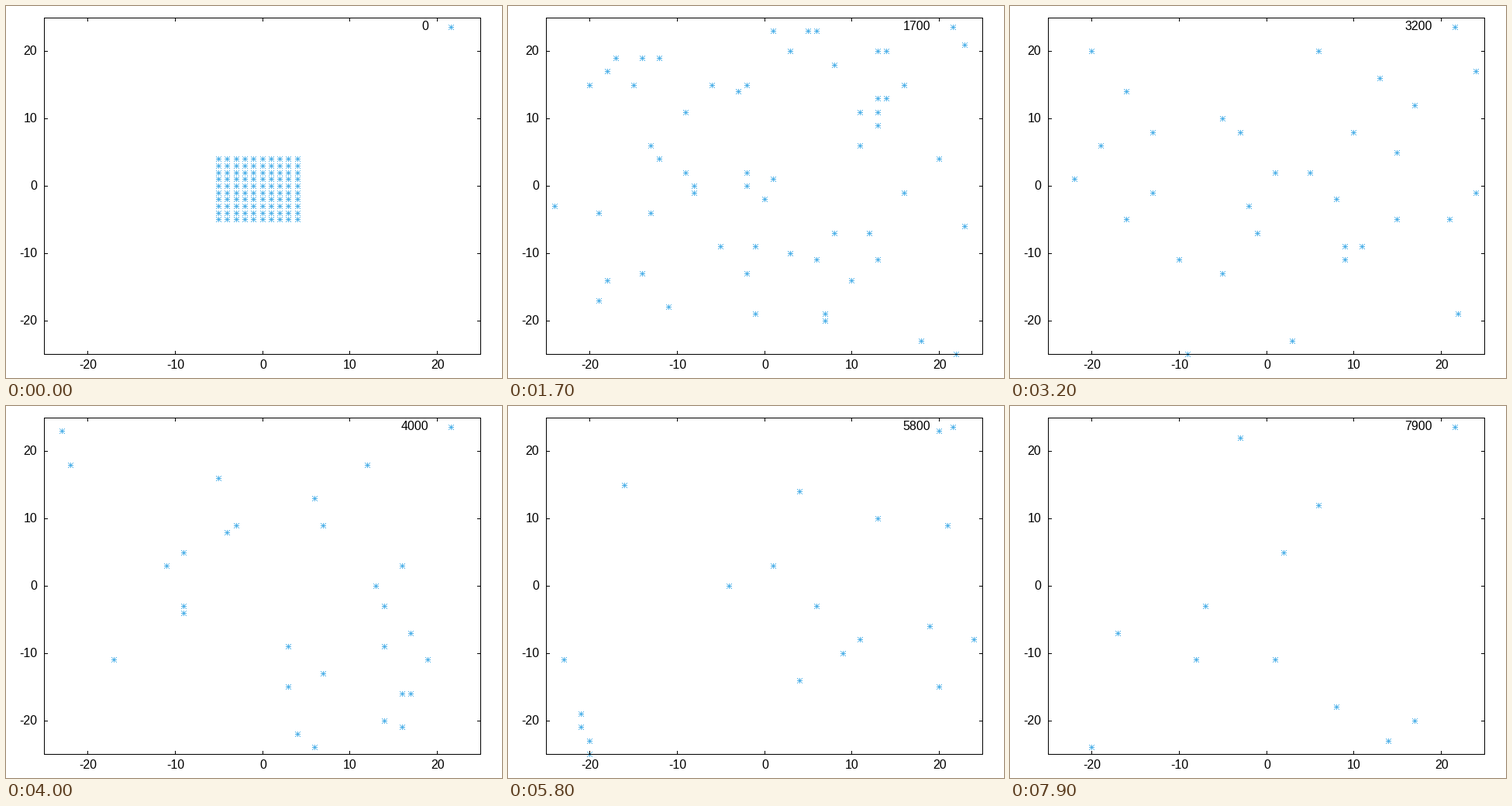
Write a matplotlib script that moves like this. It is 640 px wide and 480 px high and loops after 8000 ms.

```python
import numpy as np
import matplotlib.pyplot as plt
from matplotlib.animation import FuncAnimation
from matplotlib.collections import PolyCollection
from matplotlib.patches import Rectangle

W, H, DPI = 640, 480, 100
LEFT, RIGHT, TOP, BOTTOM = 49, 612, 15, 449
LIM = 25
FRAMES, STEPS = 80, 100
SPREAD = 5.5  # deviation per axis after STEPS steps
SKY = "#56B4E9"


def walk():
    """Free lattice walks of 100 particles, starting as a 10 x 10 block."""
    rng = np.random.default_rng(11)
    side = np.arange(-5, 5)
    start = np.stack(np.meshgrid(side, side), -1).reshape(-1, 2)
    moves = rng.normal(0, SPREAD, (FRAMES, len(start), 2))
    moves[0] = 0
    return np.rint(start + moves.cumsum(axis=0))


def px(x):
    return np.floor(LEFT + (x + LIM) * (RIGHT - LEFT) / (2 * LIM) + 0.5)


def py(y):
    return BOTTOM - np.floor((y + LIM) * (BOTTOM - TOP) / (2 * LIM) + 0.5)


# Seven-pixel asterisk built from unit squares.
DOTS = np.array(sorted({p for d in range(-3, 4)
                        for p in ((d, 0), (0, d), (d, d), (d, -d))}))
CELL = np.array([(0, 0), (1, 0), (1, 1), (0, 1)])
STAR = DOTS[:, None, :] + CELL
KEY = (574, 27)


def stars(points):
    seen = points[np.all((points >= -LIM) & (points < LIM), axis=1)]
    spots = np.stack([px(seen[:, 0]), py(seen[:, 1])], -1)
    spots = np.vstack([spots, KEY])
    return (spots[:, None, None, :] + STAR).reshape(-1, 4, 2)


fig = plt.figure(figsize=(W / DPI, H / DPI), dpi=DPI, facecolor="white")
ax = fig.add_axes([0, 0, 1, 1])
ax.set_xlim(0, W)
ax.set_ylim(H, 0)
ax.axis("off")


def bar(x0, y0, x1, y1):
    ax.add_patch(Rectangle((x0, y0), x1 - x0 + 1, y1 - y0 + 1, fc="black",
                           lw=0, antialiased=False, zorder=3))


def label(x, y, text, ha):
    return ax.text(x, y, text, ha=ha, va="baseline", color="black",
                   family="Liberation Sans", size=16 * 72 / DPI, zorder=4)


for x in (LEFT, RIGHT):
    bar(x, TOP, x, BOTTOM)
for y in (TOP, BOTTOM):
    bar(LEFT, y, RIGHT, y)
for v in range(-20, 21, 10):
    x, y = px(v), py(v)
    bar(x, TOP, x, TOP + 4)
    bar(x, BOTTOM - 4, x, BOTTOM)
    bar(LEFT, y, LEFT + 4, y)
    bar(RIGHT - 4, y, RIGHT, y)
    label(x + 1, 468, str(v), "center")
    label(40, y + 5, str(v), "right")

count = label(545, 31, "0", "right")
cloud = PolyCollection([], facecolors=SKY, edgecolors="none", linewidths=0,
                       antialiaseds=False, snap=False, zorder=2)
ax.add_collection(cloud, autolim=False)
path = walk()


def draw(i):
    cloud.set_verts(stars(path[i]))
    count.set_text(str(i * STEPS))
    return cloud, count


anim = FuncAnimation(fig, draw, frames=FRAMES, interval=100, repeat=True,
                     repeat_delay=0, blit=False)
plt.show()
```
